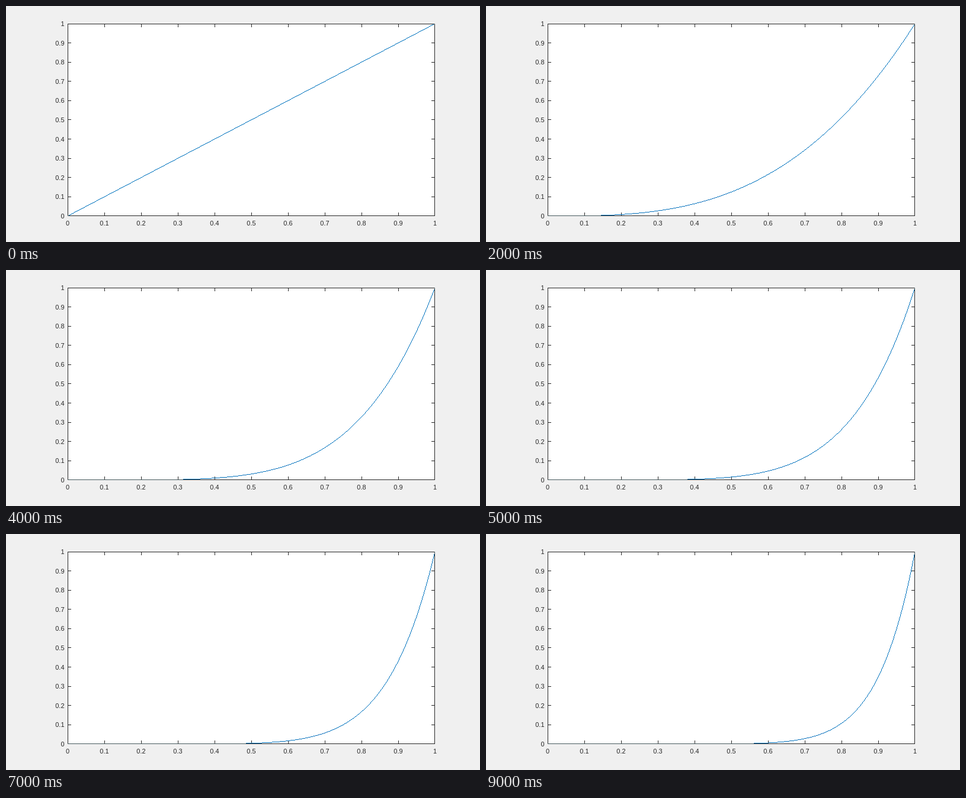
Animation, 800 px wide and 400 px high, one loop 9.5 s. Source, as an HTML page with a canvas:

```html
<!DOCTYPE html>
<html lang="en">
<head>
<meta charset="utf-8">
<title>Power curve</title>
<style>
  html, body { margin: 0; width: 100%; height: 100%; overflow: hidden; background: #f0f0f0; }
  canvas { display: block; width: 800px; height: 400px; }
</style>
</head>
<body>
<canvas id="stage" width="800" height="400"></canvas>
<script>
const ctx = document.getElementById('stage').getContext('2d');

// Plot area in pixels; BOTTOM and RIGHT are exclusive edges.
const LEFT = 104, TOP = 30, W = 620, H = 326;
const RIGHT = LEFT + W, BOTTOM = TOP + H;
const TICK = 6, SEGMENTS = 100;
const STEP_MS = 500, STEPS = 19;
const INK = '#262626', BLUE = '#0072bd', OVERLAP = '#465a5e';

function box(color, x, y, w, h) {
  ctx.fillStyle = color;
  ctx.fillRect(x, y, w, h);
}

function drawAxes() {
  box('#f0f0f0', 0, 0, 800, 400);
  box('#ffffff', LEFT, TOP, W, H);
  box(INK, LEFT, TOP, W, 1);
  box(INK, LEFT, BOTTOM - 1, W, 1);
  box(INK, LEFT, TOP, 1, H);
  box(INK, RIGHT - 1, TOP, 1, H);

  for (let k = 1; k < 10; k++) {
    const x = LEFT + W * k / 10;
    const y = BOTTOM - 1 - Math.floor(H * k / 10);
    box(INK, x, TOP, 1, TICK);
    box(INK, x, BOTTOM - TICK, 1, TICK);
    box(INK, LEFT, y, TICK, 1);
    box(INK, RIGHT - TICK, y, TICK, 1);
  }

  ctx.font = '11px "Liberation Sans", Arial, sans-serif';
  ctx.fillStyle = INK;
  for (let k = 0; k <= 10; k++) {
    const label = String(k / 10);
    ctx.textAlign = 'center';
    ctx.fillText(label, LEFT + W * k / 10, 372);
    ctx.textAlign = 'right';
    ctx.fillText(label, 98.5, Math.round(BOTTOM - H * k / 10) + 4);
  }
}

// px, py count pixels from the lower left corner of the plot.
function dot(px, py) {
  const x = LEFT + px, y = BOTTOM - 1 - py;
  const onFrame = x === LEFT || x === RIGHT - 1 || y === TOP || y === BOTTOM - 1;
  box(onFrame ? OVERLAP : BLUE, x, y, 1, 1);
}

// Hard-edged line, sampled at pixel centres along its longer side.
function segment(x0, y0, x1, y1) {
  const slope = (y1 - y0) / (x1 - x0);
  if (slope <= 1) {
    for (let i = Math.ceil(x0 - 0.5); i + 0.5 < x1; i++) {
      dot(i, Math.floor(y0 + (i + 0.5 - x0) * slope));
    }
  } else {
    for (let j = Math.ceil(y0 - 0.5); j + 0.5 < y1; j++) {
      dot(Math.floor(x0 + (j + 0.5 - y0) / slope), j);
    }
  }
}

function drawCurve(power) {
  const height = i => H * Math.pow(i / SEGMENTS, power);
  for (let i = 0; i < SEGMENTS; i++) {
    segment(W * i / SEGMENTS, height(i), W * (i + 1) / SEGMENTS, height(i + 1));
  }
}

let shown = -1;
const start = performance.now();

function frame() {
  const t = Math.max(0, performance.now() - start);
  const step = Math.floor(t / STEP_MS) % STEPS;
  if (step !== shown) {
    shown = step;
    drawAxes();
    drawCurve(1 + step / 2);
  }
  requestAnimationFrame(frame);
}
frame();
</script>
</body>
</html>
```
